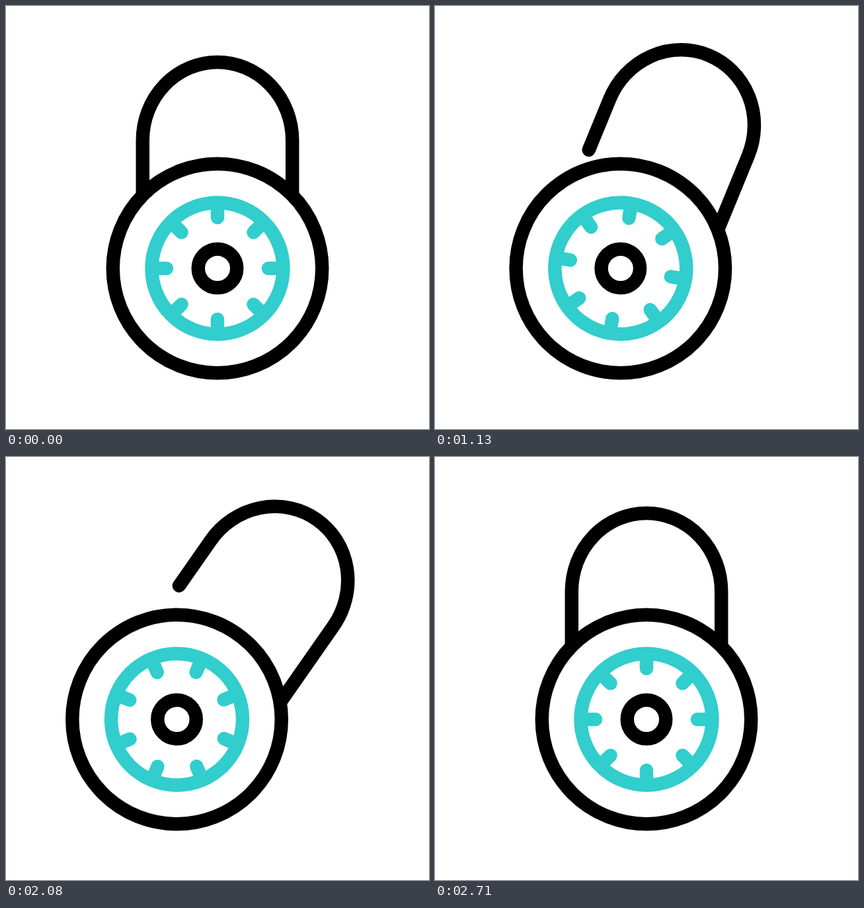
Animation of 640x640 px, one loop 3000 ms. Source, as an HTML page:

```html
<!DOCTYPE html>
<html lang="en">
<head>
<meta charset="utf-8">
<title>Combination lock</title>
<style>
  html, body { margin: 0; width: 100%; height: 100%; overflow: hidden; background: #fff; }
  svg { display: block; width: 100vw; height: 100vh; }
</style>
</head>
<body>
<svg viewBox="0 0 640 640" fill="none" stroke="#000" stroke-width="20.5" stroke-linecap="round">
  <path id="shackle" d="M206.8 286.3V203a113.2 118 0 0 1 226.4 0V370"/>
  <g id="body">
    <circle cx="320" cy="397" r="158.25" fill="#fff"/>
    <circle cx="320" cy="397" r="29.25"/>
    <g id="dial" stroke="#32cdcd">
      <circle cx="320" cy="397" r="99.5"/>
    </g>
  </g>
</svg>
<script>
const FPS = 24, LOOP = 3000;
const [shackle, body, dial] = ['shackle', 'body', 'dial'].map(id => document.getElementById(id));

for (let i = 0; i < 8; i++) {
  const tick = document.createElementNS('http://www.w3.org/2000/svg', 'path');
  tick.setAttribute('d', 'M320 298V320');
  tick.setAttribute('transform', `rotate(${i * 45} 320 397)`);
  dial.append(tick);
}

const progress = (t, from, to) => Math.min(1, Math.max(0, (t - from) / (to - from)));
const easeIn = x => x ** 2.5;
const easeOut = x => 1 - easeIn(1 - x);

// Dial turn while unlocking: [time, degrees, degrees per step]
const turn = [[0, 0, 7], [11, 112.7, 12], [21, 213.8, 6], [27, 234.4, 2.3], [35, 247.4, 0]];

function dialAngle(t) {
  const i = turn.findIndex(key => key[0] > t);
  if (i < 0) return turn.at(-1)[1];
  const [t0, a, va] = turn[i - 1], [t1, b, vb] = turn[i];
  const d = t1 - t0, x = (t - t0) / d, y = 1 - x;
  return y * y * (1 + 2 * x) * a + x * x * (3 - 2 * x) * b + d * x * y * (y * va - x * vb);
}

function draw(now) {
  const step = Math.floor((now % LOOP) * FPS / 1000 + 0.1) % (LOOP * FPS / 1000);
  const back = 1 - easeIn(progress(step, 49.2, 64.7));
  const open = easeOut(progress(step, 23, 35)) * back;
  body.setAttribute('transform', `translate(${-61.5 * open} 0)`);
  dial.setAttribute('transform', `rotate(${dialAngle(step) * back} 320 397)`);
  shackle.setAttribute('transform',
    `translate(${-83.8 * open} ${41.8 * open}) rotate(${35 * open} 488 440)`);
}

const start = performance.now();
(function frame() {
  draw(performance.now() - start);
  requestAnimationFrame(frame);
})();
</script>
</body>
</html>
```
